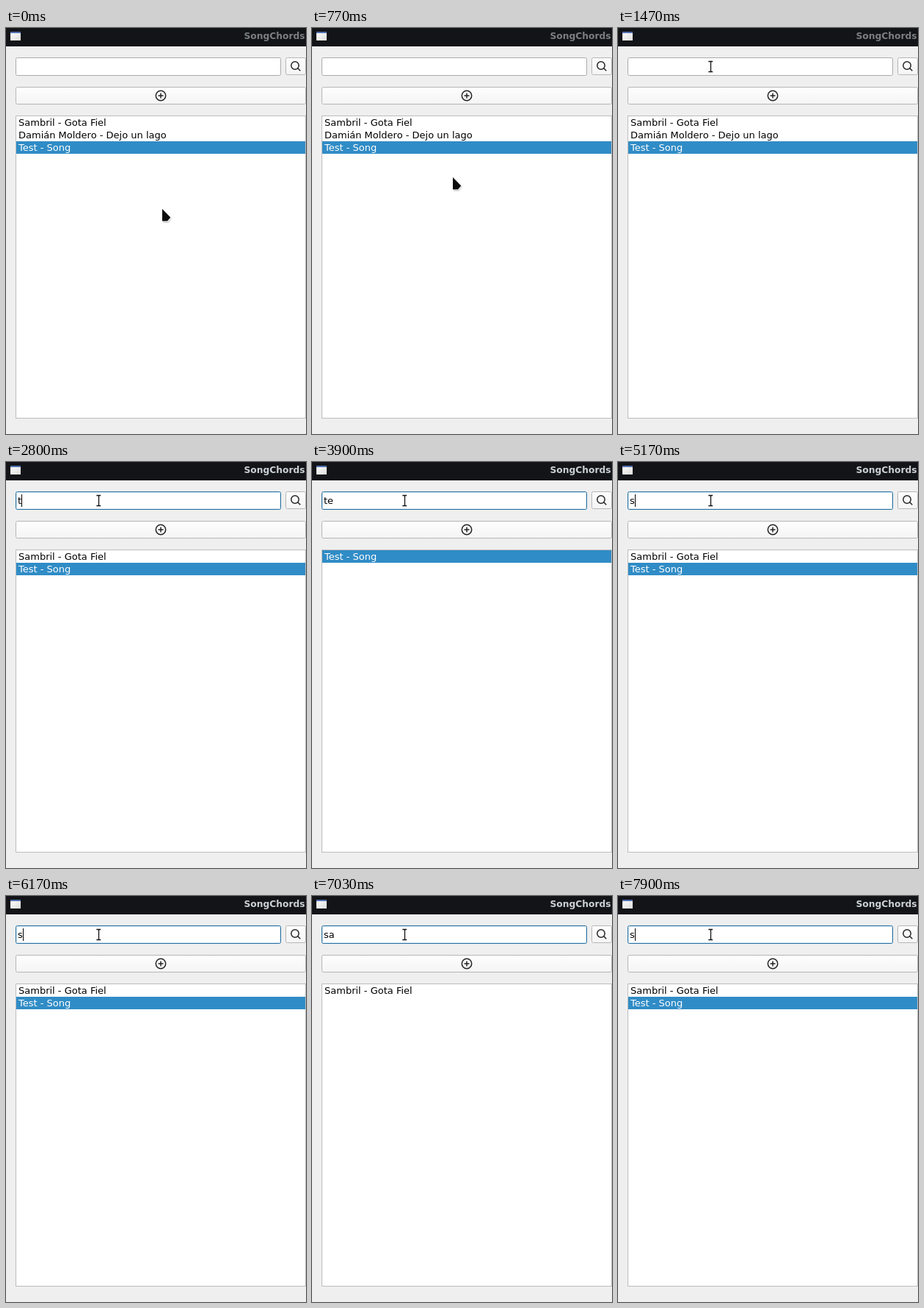
An HTML page that plays this animation: 409x552 px, repeating every 8 s.

```html
<!DOCTYPE html>
<html lang="es">
<head>
<meta charset="utf-8">
<title>SongChords</title>
<style>
  html, body { margin: 0; width: 100%; height: 100%; overflow: hidden; background: #efefef; }
  svg { display: block; }
  text { font: 13px "DejaVu Sans", sans-serif; white-space: pre; }
  #title { font-weight: bold; font-size: 12.25px; fill: #7a7f82; }
  .active #title { fill: #cbd1d6; }
  #field { fill: #fff; stroke: #ababab; }
  .active #field { stroke: #266f9e; }
  #glow { fill: none; stroke: #308cc6; stroke-opacity: 0; }
  .active #glow { stroke-opacity: .16; }
  .button { fill: url(#face); stroke: #b6b6b6; }
  .icon { fill: none; stroke: #232323; stroke-width: 1.5; }
</style>
</head>
<body>
<svg id="app" width="409" height="552" viewBox="0 0 409 552">
  <defs>
    <linearGradient id="face" x2="0" y2="1">
      <stop offset="0" stop-color="#fefefe"/>
      <stop offset="1" stop-color="#f4f4f4"/>
    </linearGradient>
    <linearGradient id="pane" x2="1" y2="1">
      <stop offset="0" stop-color="#fff"/>
      <stop offset="1" stop-color="#dcdcda"/>
    </linearGradient>
  </defs>

  <rect width="409" height="552" fill="#efefef"/>
  <rect width="409" height="25" fill="#131418"/>
  <rect x="6" y="5" width="14" height="12" fill="url(#pane)"/>
  <rect x="6" y="5" width="14" height="2" fill="#4f6fb0"/>
  <text id="title" x="407.5" y="15" text-anchor="end">SongChords</text>

  <rect id="field" x="13.5" y="40.5" width="361" height="24" rx="2"/>
  <rect id="glow" x="14.5" y="41.5" width="359" height="22" rx="1"/>
  <text id="query" x="16" y="57"></text>
  <rect id="caret" y="44" width="1" height="17"/>

  <rect class="button" x="381.5" y="40.5" width="27" height="23" rx="2"/>
  <g class="icon">
    <circle cx="394" cy="51" r="5.2"/>
    <path d="M397.8 54.8L401.3 58.3"/>
  </g>
  <rect class="button" x="13.5" y="80.5" width="395" height="23" rx="2"/>
  <g class="icon">
    <circle cx="211" cy="92" r="6.7"/>
    <path d="M207.5 92h7M211 88.5v7"/>
  </g>

  <rect x="13.5" y="119.5" width="395" height="411" fill="#fff" stroke="#bdbdbd"/>
  <g id="list"></g>

  <g id="arrow">
    <path d="M1 2L13 13L8.5 19H1Z" fill="#000" opacity=".16"/>
    <path d="M0 0L11.3 11.5L7 16.5H0Z" fill="#0b0b0b" stroke="#fff" stroke-width="1.6" paint-order="stroke"/>
  </g>
  <g id="beam" fill="none" stroke-linecap="square">
    <path id="bar" d="M-2.5 -6.5H2.5M-2.5 7.5H2.5M.5 -6V7" stroke="#fff" stroke-width="3"/>
    <use href="#bar"/>
    <path d="M-2 -6.5H2.5M-2 7.5H2.5M.5 -6V7" stroke="#111" stroke-width="1.3"/>
  </g>
</svg>
<script>
const LOOP = 8000, ROW = 17, TOP = 120;
const songs = ['Sambril - Gota Fiel', 'Damián Moldero - Dejo un lago', 'Test - Song'];
const selected = 2;

// start time, typed query, caret visible
const typing = [
  [0, '', false], [1600, '', true], [2170, '', false],
  [2800, 't', true], [3200, 'te', true], [3900, 'te', false],
  [4400, 't', true], [4530, '', true],
  [5170, 's', true], [5500, 'so', true], [5670, 'son', false], [6170, 's', true],
  [6370, 'sa', true], [7030, 'sa', false], [7230, 'sam', true],
  [7770, 'sa', true], [7900, 's', true]
];

// start time, end time, from, to
const moves = [
  [567, 867, [213, 246], [185, 189]],
  [1067, 1470, [185, 189], [126, 52]]
];

const $ = id => document.getElementById(id);
const ease = p => p * p * (3 - 2 * p);

const rows = songs.map((name, i) => {
  const row = document.createElementNS('http://www.w3.org/2000/svg', 'g');
  const on = i === selected;
  row.innerHTML = (on ? `<rect x="14" width="394" height="${ROW}" fill="#308cc6"/>` : '') +
    `<text x="17" y="13" fill="${on ? '#fff' : '#000'}">${name}</text>`;
  $('list').append(row);
  return row;
});

function filter(query) {
  let y = TOP;
  rows.forEach((row, i) => {
    const match = songs[i].toLowerCase().includes(query);
    row.style.display = match ? '' : 'none';
    if (!match) return;
    row.setAttribute('transform', `translate(0 ${y})`);
    y += ROW;
  });
}

function pointer(t) {
  const [start, end, from, to] = t < moves[1][0] ? moves[0] : moves[1];
  const p = ease(Math.min(1, Math.max(0, (t - start) / (end - start))));
  return from.map((v, i) => Math.round(v + (to[i] - v) * p));
}

let current;
function draw(now) {
  const t = now % LOOP;
  const state = typing.findLast(s => s[0] <= t);
  if (state !== current) {
    current = state;
    const [, query, caret] = state;
    $('query').textContent = query;
    $('caret').setAttribute('x', Math.round(16 + (query ? $('query').getComputedTextLength() : 0)));
    $('caret').style.display = caret ? '' : 'none';
    filter(query);
  }
  $('app').classList.toggle('active', t >= 1600);

  const [x, y] = pointer(t);
  const inField = x > 13 && x < 375 && y > 40 && y < 65;
  for (const [id, shown] of [['arrow', !inField], ['beam', inField]]) {
    $(id).style.display = shown ? '' : 'none';
    $(id).setAttribute('transform', `translate(${x} ${y})`);
  }
}

const begin = performance.now();
function tick() {
  draw(performance.now() - begin);
  requestAnimationFrame(tick);
}
tick();
</script>
</body>
</html>
```
